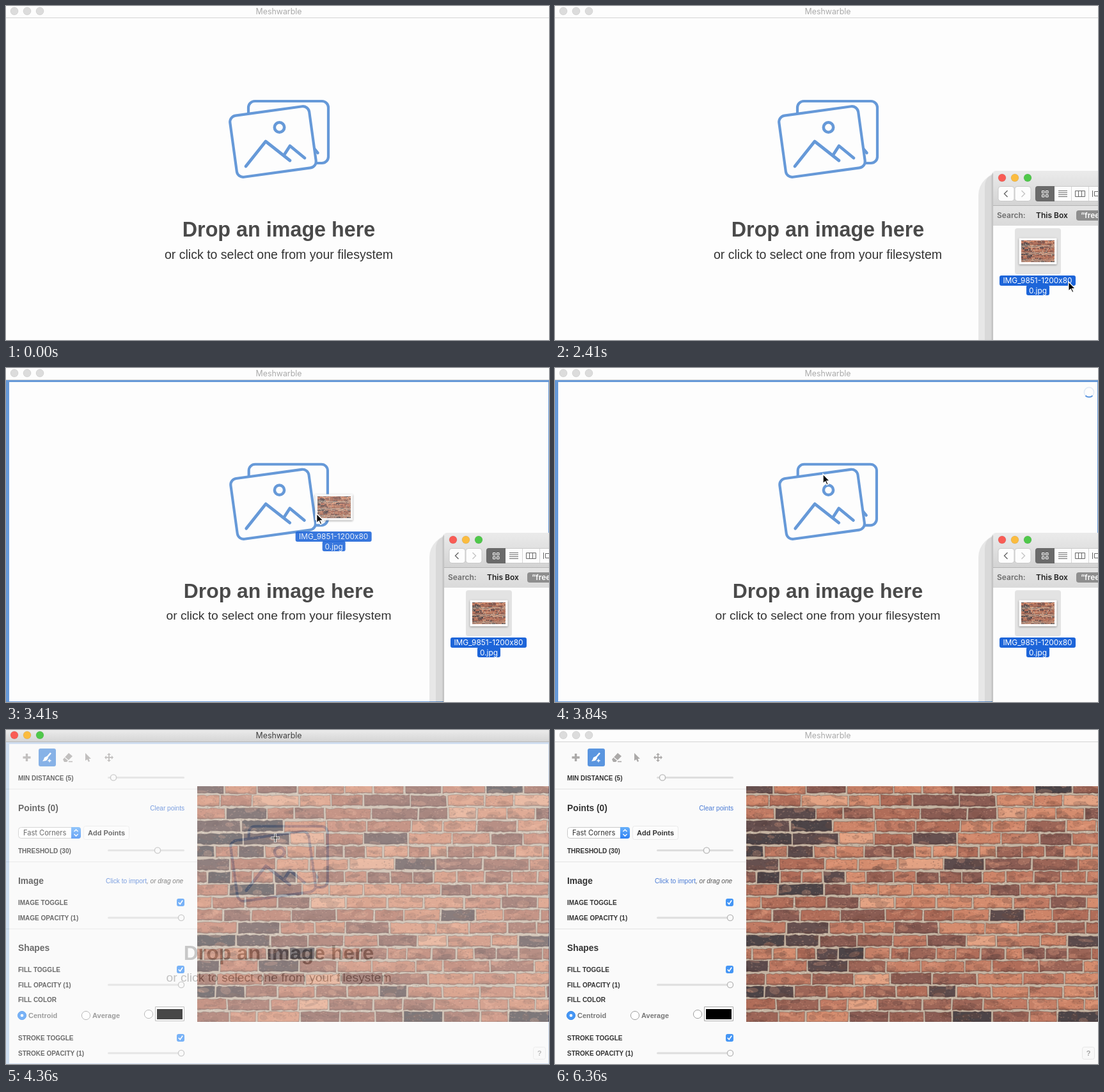
An HTML page with a canvas that plays this animation: 849 by 523 pixels, repeating every 6.47 s.

```html
<!DOCTYPE html>
<html lang="en">
<head>
<meta charset="utf-8">
<title>Meshwarble</title>
<style>
html, body { margin: 0; width: 100%; height: 100%; overflow: hidden; background: #fdfdfd; }
canvas { display: block; }
</style>
</head>
<body>
<canvas id="stage" width="849" height="523"></canvas>
<script>
const W = 849, H = 523, LOOP = 6470;
const BLUE = '#6699d8', PAGE = '#fdfdfd';
const SANS = '"Liberation Sans", Arial, sans-serif', UI = 'Inter, sans-serif';
const screen = document.getElementById('stage').getContext('2d');
let g = screen;

// ---------- helpers ----------
function layer(w, h, draw) {
  const c = document.createElement('canvas'), old = g;
  c.width = w; c.height = h;
  g = c.getContext('2d');
  draw();
  g = old;
  return c;
}
function paint(fill, stroke, width = 1) {
  if (fill) { g.fillStyle = fill; g.fill(); }
  if (stroke) { g.strokeStyle = stroke; g.lineWidth = width; g.stroke(); }
}
function box(x, y, w, h, fill, r = 0, stroke) {
  g.beginPath(); g.roundRect(x, y, w, h, r); paint(fill, stroke);
}
function disc(x, y, r, fill, stroke, width) {
  g.beginPath(); g.arc(x, y, r, 0, 7); paint(fill, stroke, width);
}
function line(points, stroke, width, fill) {
  g.beginPath();
  for (let i = 0; i < points.length; i += 2) g.lineTo(points[i], points[i + 1]);
  if (fill) g.closePath();
  paint(fill, stroke, width);
}
function text(s, x, y, font, color, align = 'left') {
  g.font = font; g.fillStyle = color; g.textAlign = align;
  g.fillText(s, x, y);
  return g.measureText(s).width;
}
function shade(y0, y1, a, b) {
  const f = g.createLinearGradient(0, y0, 0, y1);
  f.addColorStop(0, a); f.addColorStop(1, b);
  return f;
}
const mix = (a, b, k) => a + (b - a) * k;
// Linear keyframes [time, ...values]
function track(t, keys) {
  let i = 1;
  while (i < keys.length - 1 && t > keys[i][0]) i++;
  const [a, b] = [keys[i - 1], keys[i]];
  const k = Math.min(1, Math.max(0, (t - a[0]) / (b[0] - a[0])));
  return a.slice(1).map((v, j) => mix(v, b[j + 1], k));
}

// ---------- brick wall ----------
let seed = 4711;
const rnd = (a = 0, b = 1) => mix(a, b, (seed = seed * 16807 % 2147483647) / 2147483647);
const pick = list => list[Math.floor(rnd() * list.length)];
// Row number: x positions of bricks that stand out
const darkSpots = { 0: [20, 500], 2: [60], 3: [35, 105], 4: [30, 90, 300], 5: [25, 75], 6: [15, 335],
  7: [20, 145], 8: [100], 10: [405], 11: [105], 12: [25, 105, 510], 13: [125, 175], 14: [22, 98],
  16: [22, 70, 320], 18: [380, 500] };
const lightSpots = { 1: [140, 520], 2: [395], 4: [155], 6: [260], 9: [190], 12: [370], 15: [190], 17: [205] };
const clay = ['#c07a63', '#cd8468', '#b06d59', '#d48c6e', '#9c6557', '#c47f66', '#8a5c53'];

function brick(x, y, w, h, tone) {
  const top = [], bottom = [], step = w / Math.max(4, Math.round(w / 5));
  for (let d = 0; d <= w + .1; d += step) {
    top.push(x + d + rnd(-.6, .6), y + rnd(-.9, 1.1));
    bottom.unshift(x + d + rnd(-.6, .6), y + h + rnd(-1.1, .9));
  }
  g.lineJoin = 'round';
  line([...top, ...bottom], 'rgba(84,62,58,.4)', 1, tone);
  g.save();
  g.clip();
  // Broad stains, then fine grain
  for (let i = 0; i < 4; i++) {
    g.beginPath();
    g.ellipse(x + rnd(0, w), y + rnd(0, h), rnd(5, 13), rnd(2, 6), rnd(-.3, .3), 0, 7);
    paint(pick(['rgba(70,52,54,.2)', 'rgba(120,72,60,.22)', 'rgba(235,165,130,.25)']));
  }
  for (let i = 0; i < w * .8; i++) {
    g.fillStyle = pick(['rgba(70,52,54,.2)', 'rgba(245,190,160,.2)']);
    g.fillRect(x + rnd(0, w), y + rnd(0, h), rnd(1, 3), rnd(1, 2));
  }
  g.fillStyle = 'rgba(70,48,48,.25)';
  g.fillRect(x, y + h - 2, w, 3);
  g.restore();
}
const wall = layer(550, 369, () => {
  g.fillStyle = '#c4b3a1'; g.fillRect(0, 0, 550, 369);
  for (let i = 0; i < 3500; i++) {
    g.fillStyle = pick(['rgba(110,85,75,.3)', 'rgba(235,225,210,.4)']);
    g.fillRect(rnd(0, 550), rnd(0, 369), 2, 2);
  }
  for (let r = 0; r < 19; r++) {
    const short = [5, 7, 13].includes(r);
    let x = rnd(-25, 0);
    while (x < 550) {
      const w = short ? rnd(27, 46) : rnd(42, 74);
      const has = spots => (spots[r] || []).some(s => s >= x && s < x + w);
      const tone = has(darkSpots) ? pick(['#5c4b4c', '#66504f', '#4c4447'])
        : has(lightSpots) ? '#e2a283' : pick(clay);
      brick(x + 1.5, r * 19.95 - 5.5 + rnd(-.7, .7), w - 3, 16.6, tone);
      x += w;
    }
  }
});

// ---------- editor ----------
function slider(x, y) {
  box(159, y - 1.5, 120, 3, '#dedede', 1.5);
  disc(x, y, 4.6, '#fafafa', '#b9b9b9', 1.4);
}
function check(y) {
  box(267, y - 6, 12, 12, '#4596f5', 3);
  line([269.8, y, 272.2, y + 2.8, 276.2, y - 3.2], '#fff', 1.6);
}
function radio(x, y, on) {
  disc(x, y, 6.6, on ? '#4596f5' : '#fff', on ? '#3d8cea' : '#a0a0a0');
  if (on) disc(x, y, 2.3, '#fff');
}
function plus(x, y, r, width, color) {
  line([x - r, y, x + r, y], color, width);
  line([x, y - r, x, y + r], color, width);
}
function toolbar() {
  const gray = '#aba9a8';
  plus(32.5, 43, 6, 3.4, gray);
  box(51, 29, 27, 28, '#5a95df', 3);
  line([70, 36, 64, 43], '#fff', 2.6);
  line([64, 41, 66, 44, 63, 48, 57, 49, 59, 46, 60, 43], null, 0, '#fff');
  plus(68, 48, 2.6, 1.4, '#fff');
  line([89, 46, 98, 36, 104, 41, 95, 50, 91, 50], null, 0, gray);
  line([92, 43, 98, 48], '#fafafa', 1.2);
  line([98, 49.5, 104, 49.5], gray, 1.6);
  line([124, 36, 124, 48, 127, 46, 129, 50, 131, 49, 129.5, 45, 133, 45], null, 0, gray);
  plus(161, 43, 5, 1.8, gray);
  for (let i = 0; i < 4; i++) {
    g.save(); g.translate(161, 43); g.rotate(i * Math.PI / 2);
    line([4, -3, 7, 0, 4, 3], null, 0, gray);
    g.restore();
  }
}
const editor = layer(W, H, () => {
  g.fillStyle = '#fafafa'; g.fillRect(0, 0, W, H);
  toolbar();
  for (const y of [92, 206, 311]) box(0, y, 299, 1, '#e3e3e3');
  const labels = { 79: 'MIN DISTANCE (5)', 193: 'THRESHOLD (30)', 274: 'IMAGE TOGGLE', 298: 'IMAGE OPACITY (1)',
    379: 'FILL TOGGLE', 403: 'FILL OPACITY (1)', 426: 'FILL COLOR', 486: 'STROKE TOGGLE', 510: 'STROKE OPACITY (1)' };
  for (const y in labels) text(labels[y], 19, +y, `bold 10px ${SANS}`, '#333');
  const heads = { 127: 'Points (0)', 241: 'Image', 346: 'Shapes' };
  for (const y in heads) text(heads[y], 19, +y, `bold 13.8px ${SANS}`, '#333');
  [[168, 74.5], [237, 188.5], [274, 294], [274, 399], [274, 506]].forEach(p => slider(...p));
  [270, 375, 482].forEach(check);

  text('Clear points', 279, 126, `10.1px ${SANS}`, '#4a7bd5', 'right');
  const w = text('Click to import', 156, 240, `10.1px ${SANS}`, '#4a7bd5');
  text(', or drag one', 156 + w, 240, `italic 10.1px ${SANS}`, '#555');

  box(19.5, 152.5, 97, 17, '#fff', 4, '#c9c9c9');
  box(102, 152, 15, 18, shade(152, 170, '#69b1fa', '#2d80f2'), [0, 4, 4, 0]);
  line([106.5, 159, 109.5, 156, 112.5, 159], '#fff', 1.4);
  line([106.5, 163, 109.5, 166, 112.5, 163], '#fff', 1.4);
  text('Fast Corners', 27, 165, `11.1px ${UI}`, '#333');
  box(121.5, 150.5, 71, 21, '#fcfcfc', 3, '#e9e9e9');
  text('Add Points', 128, 165, `bold 11px ${SANS}`, '#333');

  radio(25, 447, true); radio(125, 447); radio(223, 445);
  text('Centroid', 35, 451, `bold 11px ${SANS}`, '#777');
  text('Average', 135, 451, `bold 11px ${SANS}`, '#777');
  box(233.5, 433.5, 45, 22, '#fdfdfd', 0, '#a9a9a9');
  box(236, 437, 40, 16, '#000');

  g.drawImage(wall, 299, 88);
  box(824.5, 496.5, 19, 19, '#f8f8f8', 3, '#e6e6e6');
  text('?', 834, 510, `bold 11px ${SANS}`, '#a2a2a2', 'center');
});

// ---------- file window ----------
function file(x, y) {
  g.save();
  g.shadowColor = 'rgba(0,0,0,.4)'; g.shadowBlur = 3; g.shadowOffsetY = 1;
  box(x - 29.5, y - 20.5, 59, 41, '#fff', 1);
  g.restore();
  g.drawImage(wall, x - 26, y - 17, 52, 34);
  box(x - 60, y + 38, 119, 16, '#1d65d9', 3);
  box(x - 18, y + 53, 36, 16, '#1d65d9', 3);
  text('IMG_9851-1200x80', x - .5, y + 50, `11.9px ${UI}`, '#fff', 'center');
  text('0.jpg', x, y + 66, `11.9px ${UI}`, '#fff', 'center');
}
const lights = (x, y, colors) => colors.forEach((c, i) => disc(x + i * 20, y, 6, c, 'rgba(0,0,0,.08)'));
const LIT = ['#f95c55', '#fbbc3f', '#4fc84a'], DIM = ['#dcdcdc', '#dcdcdc', '#dcdcdc'];

const finder = layer(W, H, () => {
  box(662, 262, 300, 400, 'rgba(0,0,0,.085)', 34);
  box(672, 260, 300, 400, 'rgba(0,0,0,.06)', 22);
  box(682, 258, 300, 400, 'rgba(0,0,0,.07)', 8);
  box(685, 258, 300, 400, '#fdfdfd', [5, 0, 0, 0]);
  box(685, 258, 300, 55, shade(258, 313, '#ebebeb', '#d3d3d3'), [5, 0, 0, 0]);
  box(685, 313, 300, 31, shade(313, 344, '#e4e4e4', '#dadada'));
  box(685, 312, 300, 1, '#b4b4b4');
  box(684, 262, 1, 300, '#bdbdbd');
  lights(699, 269, LIT);
  box(693, 282.5, 25, 23, '#fdfdfd', 4, '#c9c9c9');
  box(719, 282.5, 25, 23, '#fdfdfd', 4, '#c9c9c9');
  line([707.5, 289, 702.5, 294, 707.5, 299], '#666', 1.4);
  line([729.5, 289, 734.5, 294, 729.5, 299], '#c4c4c4', 1.4);
  box(751, 282.5, 120, 23, '#fdfdfd', 4, '#c9c9c9');
  box(751, 282, 30, 24, '#6a6a6a', [4, 0, 0, 4]);
  for (const x of [761.5, 767.5]) for (const y of [289.5, 295.5]) box(x, y, 3.5, 3.5, null, 0, '#fff');
  for (let y = 289.5; y < 300; y += 3) line([787, y, 801, y], '#666', 1);
  box(813.5, 289.5, 15, 9, null, 0, '#666');
  line([818.5, 289, 818.5, 299], '#666', 1); line([823.5, 289, 823.5, 299], '#666', 1);
  line([840.5, 289, 840.5, 299], '#666', 1); box(843.5, 290.5, 12, 7, null, 0, '#666');
  for (const x of [807, 834]) box(x, 283, 1, 22, '#d6d6d6');
  text('Search:', 691, 332, `600 12px ${UI}`, '#6e6e6e');
  text('This Box', 752, 332, `600 12px ${UI}`, '#222');
  box(815, 320, 60, 16, '#8e8e8e', 4);
  text('“free', 822, 332, `600 12px ${UI}`, '#fff');
  box(719, 348, 72, 72, '#e3e3e3', 4);
  file(755, 384);
});

// ---------- drop page ----------
function pictures() {
  g.lineCap = g.lineJoin = 'round';
  g.beginPath(); g.roundRect(379, 149, 125, 97, 10); paint(null, BLUE, 4.2);
  line([480, 221, 487.5, 230], BLUE, 4.5);
  g.save();
  g.translate(417.5, 212.5); g.rotate(-.137);
  g.beginPath(); g.roundRect(-62.5, -48.5, 125, 97, 10); paint(PAGE, BLUE, 4.2);
  g.restore();
  disc(427.5, 190, 7.7, null, BLUE, 4.6);
  line([375, 251, 406, 212, 444, 242], BLUE, 4.8);
  line([435, 233, 444, 219, 467, 238], BLUE, 4.8);
  g.lineCap = 'butt'; g.lineJoin = 'miter';
}
const dropArea = document.createElement('canvas');
dropArea.width = W; dropArea.height = H;
function dropPage(hover, spinAt) {
  const old = g;
  g = dropArea.getContext('2d');
  g.fillStyle = PAGE; g.fillRect(0, 0, W, H);
  if (hover) {
    g.globalAlpha = hover;
    g.fillStyle = BLUE; g.fillRect(0, 0, W, H);
    g.globalAlpha = 1;
    g.fillStyle = PAGE; g.fillRect(5, 22, 843, 500);
  }
  g.save();
  const s = mix(1, .986, hover);
  g.translate(426.5, 271); g.scale(s, s); g.translate(-426.5, -271);
  pictures();
  text('Drop an image here', 426.5, 361, `bold 32.3px ${SANS}`, '#4a4a4a', 'center');
  text('or click to select one from your filesystem', 426.5, 396, `19.55px ${SANS}`, '#333', 'center');
  g.restore();
  if (spinAt !== null) {
    disc(835, 38, 7.6, null, '#e3ebf6', 1.6);
    g.beginPath(); g.arc(835, 38, 7.6, spinAt - .8, spinAt + .8); paint(null, '#5a95df', 2);
  }
  g = old;
}

// ---------- pointers ----------
function arrow(x, y) {
  g.save(); g.translate(x, y);
  line([0, 0, 0, 15, 3.5, 11.8, 6, 17, 8.3, 16, 6, 11, 10.7, 11], '#fff', 1.4, '#000');
  g.restore();
}
function noEntry(x, y) {
  disc(x, y, 8, 'rgba(245,245,245,.9)', '#a5a5a5', 3);
  line([x - 5.5, y - 5.5, x + 5.5, y + 5.5], '#a5a5a5', 3);
}
function cross(x, y) {
  plus(x, y, 7, 3.4, '#fff');
  plus(x, y, 6.5, 1.2, '#111');
}

function titleBar(t) {
  const active = t >= 4270 && t < 5960;
  const [k] = track(t, [[4110, 0], [4230, 1], [5960, 1], [6360, 0]]);
  box(0, 0, W, 18, active ? shade(0, 18, '#ebebeb', '#d5d5d5') : PAGE);
  box(0, 18, W, 1, active ? '#b8b8b8' : '#d4d4d4');
  lights(13, 8, active ? LIT : DIM);
  const v = Math.round(mix(170, 64, k));
  text('Meshwarble', 426.5, 13, `12.4px ${UI}`, `rgb(${v},${v},${v})`, 'center');
}

function render(t) {
  const [cover] = track(t, [[4090, 1], [4190, .45], [4270, .32], [4360, .28], [4620, 0]]);
  if (cover < 1) g.drawImage(editor, 0, 0);
  if (cover > 0) {
    const [hover] = track(t, [[3130, 0], [3300, 1]]);
    const spin = t >= 3670 && t < 4100 ? Math.PI * (.5 + (t - 3840) / 500) : null;
    dropPage(hover, spin);
    g.globalAlpha = cover;
    g.drawImage(dropArea, 0, 0);
    g.globalAlpha = 1;
  }
  titleBar(t);
  if (t >= 1490 && t < 4270) g.drawImage(finder, 0, 0);

  if (t >= 2240 && t < 4270) {
    const [x, y] = track(t, [[2200, 856, 470], [2640, 745, 390], [2940, 745, 390], [3060, 708, 437],
      [3200, 645, 395], [3400, 490, 232], [3580, 419, 166]]);
    if (t >= 2940 && t < 3640) {
      const [dx, dy] = track(t, [[2940, 10, -6], [3060, 27, -10]]);
      g.globalAlpha = .88;
      file(x + dx, y + dy);
      g.globalAlpha = 1;
      if (x > 685) noEntry(x + 9, y + 20);
    }
    arrow(x, y);
  }
  if (t >= 4270 && t < 5600) {
    cross(...track(t, [[5000, 421, 169], [5200, 428, 162], [5270, 450, 160], [5400, 600, 240], [5600, 858, 440]]));
  }
}

function frame(now) {
  render(now % LOOP);
  requestAnimationFrame(frame);
}
requestAnimationFrame(frame);
</script>
</body>
</html>
```
